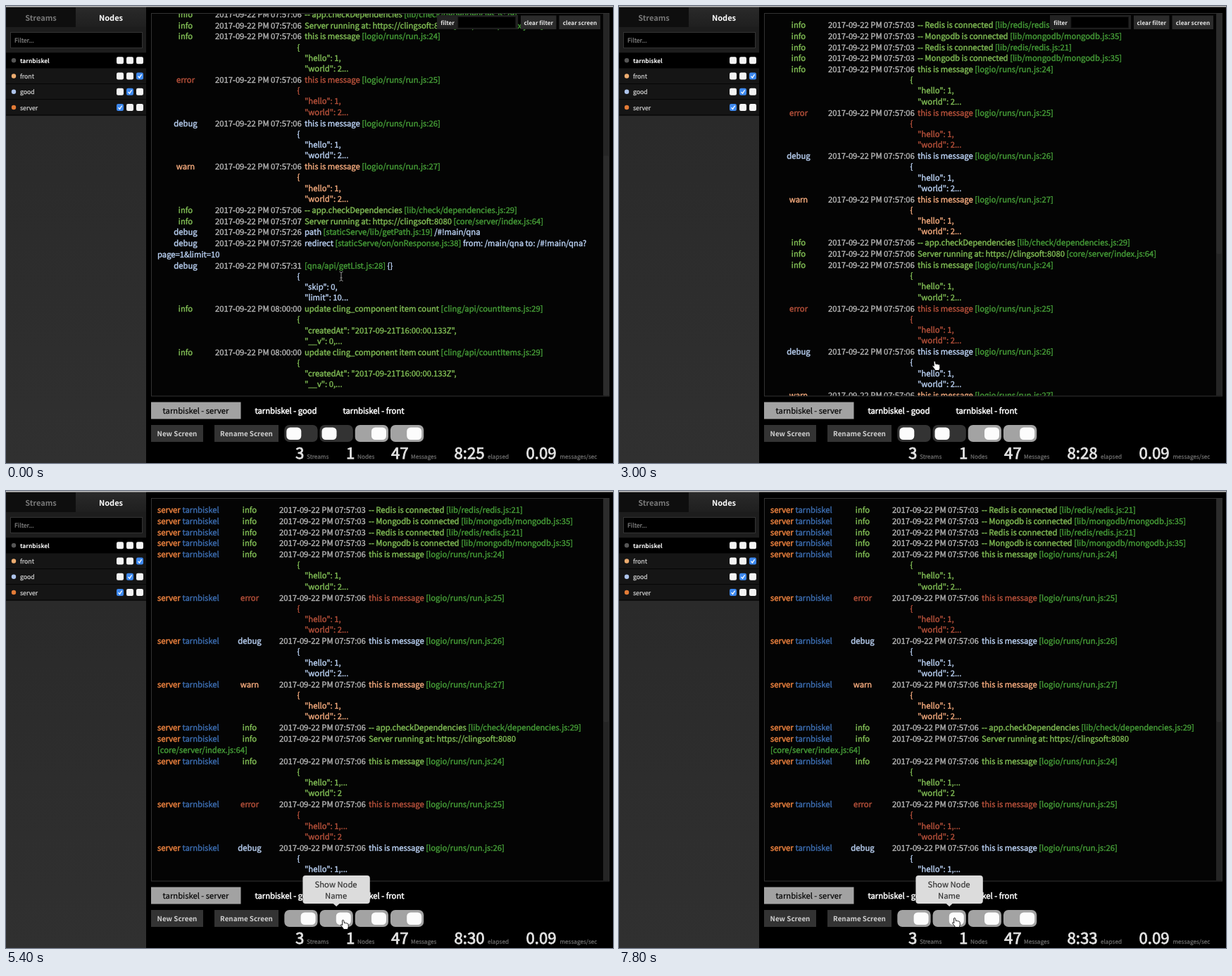
Recreate the animation shown at these times as an HTML page. Size 862 px wide and 649 px high, loop 8000 ms.

```html
<!DOCTYPE html>
<html lang="en">
<head>
<meta charset="utf-8">
<title>Log monitor</title>
<style>
html, body { margin: 0; width: 100%; height: 100%; overflow: hidden; background: #000; }
svg { display: block; width: 862px; height: 649px; }
text {
  font-family: "Noto Sans CJK SC", "Noto Sans CJK JP", "Noto Sans", sans-serif;
  font-size: 11.25px; stroke-width: .4; white-space: pre; text-rendering: geometricPrecision;
}
</style>
</head>
<body>
<script>
const LOOP = 8000, STEP = 200;
const NODE = 'tarnbiskel';
const COLORS = { info: '#80bd55', error: '#b5503a', debug: '#b9d0f2', warn: '#f2a97c' };
const GREEN = '#459c37', ORANGE = '#e27c3c', BLUE = '#3b6bad', GREY = '#b6b6b6';

function el(tag, attrs, parent) {
  const node = document.createElementNS('http://www.w3.org/2000/svg', tag);
  for (const key in attrs) node.setAttribute(key, attrs[key]);
  if (parent) parent.append(node);
  return node;
}
const svg = el('svg', { viewBox: '0 0 862 649' }, document.body);

function rect(x, y, width, height, fill, more = {}, parent = svg) {
  return el('rect', { x, y, width, height, fill, ...more }, parent);
}
function label(x, y, string, color, { size, bold, anchor = 'start', weight } = {}, parent = svg) {
  const node = el('text', { x, y, fill: color, stroke: color, 'text-anchor': anchor }, parent);
  if (size) node.style.fontSize = size + 'px';
  if (weight) node.style.strokeWidth = weight;
  if (bold) { node.style.fontWeight = 700; node.style.strokeWidth = 0; }
  node.textContent = string;
  return node;
}
const mid = (more = {}) => ({ anchor: 'middle', ...more });

function gradient(id, top, bottom) {
  const g = el('linearGradient', { id, x2: 0, y2: 1 }, defs);
  el('stop', { 'stop-color': top }, g);
  el('stop', { offset: 1, 'stop-color': bottom }, g);
  return `url(#${id})`;
}
const defs = el('defs', {}, svg);
rect(206, 11, 642, 542.5, '#000', {}, el('clipPath', { id: 'pane' }, defs));

// Sidebar
rect(0, 0, 862, 649, '#000');
rect(0, 0, 199, 649, gradient('side', '#282828', '#303030'));
rect(0, 30, 199, 37, '#1d1d1d');
rect(0, 2, 99, 28, '#0e0e0e');
rect(99, 2, 100, 28, gradient('tab', '#2a2a2a', '#1f1f1f'));
rect(0, 0, 862, 1.5, '#c4c4c4');
label(49.5, 21, 'Streams', '#777', mid({ bold: true, size: 11 }));
label(149, 21, 'Nodes', '#fff', mid({ bold: true, size: 11 }));
rect(6.5, 37.5, 187, 22, '#000', { stroke: '#333' });
label(12, 52, 'Filter...', '#888', { size: 8.7, weight: .2 });

[[NODE, '#555', -1], ['front', '#edac70', 2], ['good', '#adc3ea', 1], ['server', '#e37c37', 0]]
  .forEach(([name, color, checked], i) => {
    const y = 77.3 + i * 22.25;
    rect(0, y - 11, 199, 22.2, i ? '#151515' : '#000');
    rect(0, y + 10.5, 199, 1, '#000');
    el('circle', { cx: 11, cy: y, r: 3.2, fill: color }, svg);
    label(20, y + 3.5, name, i ? '#ccc' : '#fff', { size: i ? 8.7 : 8.4, bold: !i, weight: .25 });
    for (let k = 0; k < 3; k++) {
      const x = 162 + k * 14;
      rect(x - 5, y - 5, 10, 10, k === checked ? '#3d88ee' : '#f4f4f4', { rx: 2.2 });
      if (k === checked) {
        el('path', { d: `M${x - 2.4} ${y + .2}l1.9 2.2 3.1-4.8`, fill: 'none', stroke: '#fff', 'stroke-width': 1.3 }, svg);
      }
    }
  });

// Log pane
rect(206.5, 10.5, 650, 543.5, '#040404', { stroke: '#333' });
rect(848, 11, 8.5, 542.5, '#252525');
const thumb = rect(848.5, 11, 7.5, 341, '#2c2c2c', { rx: 2 });
const log = el('g', {}, el('g', { 'clip-path': 'url(#pane)' }, svg));

const row = (level, time, message, pre, tail) => ({ level, time, message, pre, tail });
const burst = () => Object.keys(COLORS).map((level, i) =>
  row(level, '07:57:06', `this is message [logio/runs/run.js:${24 + i}]`, ['"hello": 1,', '"world": 2']));
const boot = time => [
  row('info', '07:57:06', '-- app.checkDependencies [lib/check/dependencies.js:29]'),
  row('info', time, 'Server running at: https://clingsoft:8080 [core/server/index.js:64]')
];
const connect = [
  row('info', '07:57:03', '-- Redis is connected [lib/redis/redis.js:21]'),
  row('info', '07:57:03', '-- Mongodb is connected [lib/mongodb/mongodb.js:35]')
];
const update = row('info', '08:00:00', 'update cling_component item count [cling/api/countItems.js:29]',
  ['"createdAt": "2017-09-21T16:00:00.133Z",', '"__v": 0,']);
const rows = [
  ...connect, ...connect, ...burst(), ...boot('07:57:06'), ...burst(), ...boot('07:57:07'),
  row('debug', '07:57:26', 'path [staticServe/lib/getPath.js:19] /#!main/qna'),
  row('debug', '07:57:26', 'redirect [staticServe/on/onResponse.js:38] from: /main/qna to: /#!main/qna?', null, 'page=1&limit=10'),
  row('debug', '07:57:31', '[qna/api/getList.js:28] {}', ['"skip": 0,', '"limit": 10']),
  update, update
];

function richText(x, y, message, color) {
  const node = label(x, y, '', color, {}, log);
  for (const part of message.split(/(\[.*?\])/)) {
    const paint = part[0] === '[' ? GREEN : color;
    el('tspan', { fill: paint, stroke: paint }, node).textContent = part;
  }
}

function layout(stream, node, level) {
  const LINE = 15.75, PRE = 15.2;
  const timeX = 215 + stream * 35.5 + node * 55.5 + level * 82;
  const full = stream && node && level;
  let y = 31, wrapped = false;
  log.replaceChildren();
  for (const r of rows) {
    const color = COLORS[r.level];
    let { message, tail } = r;
    if (full && message.startsWith('Server')) {
      const cut = message.indexOf('[');
      tail = message.slice(cut);
      message = message.slice(0, cut);
      wrapped = true;
    }
    if (stream) label(215, y, 'server', ORANGE, { weight: .55 }, log);
    if (node) label(215 + stream * 35.5, y, NODE, BLUE, {}, log);
    if (level) label(timeX - 42, y, r.level, color, mid(), log);
    label(timeX, y, '2017-09-22 PM ' + r.time, GREY, {}, log);
    richText(timeX + 127, y, message, color);
    if (tail) richText(215, y += LINE, tail, color);
    if (r.pre) {
      const [a, b] = r.pre;
      label(413.5, y + PRE, '{', color, {}, log);
      label(424, y + PRE * 2, a + (wrapped ? '...' : ''), color, {}, log);
      label(424, y + PRE * 3, b + (wrapped ? '' : '...'), color, {}, log);
      y += 45.85;
    }
    y += LINE;
  }
  thumb.setAttribute('height', full ? 317 : 341);
}

// Filter controls, shown while the pointer is over the pane
const tools = el('g', {}, svg);
rect(612, 13, 115, 20, '#222', {}, tools);
rect(642, 15.5, 81.5, 15.5, '#000', { stroke: '#111' }, tools);
rect(731, 13.5, 50.5, 19.5, '#2b2b2b', {}, tools);
rect(785.5, 13.5, 58.5, 19.5, '#2b2b2b', {}, tools);
[[627, 'filter'], [756.3, 'clear filter'], [815, 'clear screen']].forEach(([x, s]) =>
  label(x, 27, s, '#e6e6e6', mid({ size: 8.2, bold: true }), tools));

// Footer
rect(206, 562.5, 127.5, 24, '#a2a2a2');
label(269.5, 579.3, NODE + ' - server', '#000', mid({ weight: .2 }));
label(397.5, 579.3, NODE + ' - good', '#fff', mid({ weight: .5 }));
label(522, 579.3, NODE + ' - front', '#fff', mid({ weight: .5 }));
[[206, 74, 'New Screen'], [296, 91, 'Rename Screen']].forEach(([x, w, s]) => {
  rect(x, 595, w, 24, '#333');
  label(x + w / 2, 611, s, '#d0d0d0', mid({ size: 9.8, bold: true }));
});
const stats = [[411, '3', 427, 'Streams'], [483, '1', 499, 'Nodes'], [547, '47', 575, 'Messages'],
  [636.5, '', 684, 'elapsed'], [738.5, '0.09', 786.5, 'messages/sec']].map(([x, value, nameX, name]) => {
  label(nameX, 642.5, name, '#747474', { size: 8.2, weight: .2 });
  return label(x, 642.5, value, '#e4e4e4', { size: 22.2, weight: .8 });
});

const toggleX = i => 395.3 + i * 50.2;
const toggles = [0, 1, 2, 3].map(i => ({
  track: rect(toggleX(i), 595, 47.3, 24, '#333', { rx: 7 }),
  knob: rect(0, 598.5, 21, 17.5, '#fcfcfc', { rx: 5.5 })
}));

const tips = [['Show Stream', 'Name'], ['Show Node', 'Name'], ['Show Level']].map((lines, i) => {
  const g = el('g', {}, svg), cx = toggleX(i) + 23.6, top = 578 - 16 * lines.length;
  rect(cx - 47.7, top, 95.4, 586 - top, '#dcdcdc', { rx: 4 }, g);
  el('path', { d: `M${cx - 5} 585.5h10l-5 4.5z`, fill: '#dcdcdc' }, g);
  lines.forEach((s, k) => label(cx - .5, top + 17 + k * 16, s, '#333', mid({ weight: .2 }), g));
  return g;
});

const cursor = el('g', {}, svg);
const beam = el('path', { d: 'M-2.5-6.5q2 0 2.5 1.5q.5-1.5 2.5-1.5M0-5v10M-2.5 6.5q2 0 2.5-1.5q.5 1.5 2.5 1.5M-1.5 2h3', fill: 'none', stroke: '#999', 'stroke-width': 1 }, cursor);
const hand = el('path', {
  d: 'M-3.5-6c.3-1 1.8-1 2.1.1l.9 3.6c.5-.8 1.7-.6 1.9.2.6-.6 1.6-.4 1.8.4.8-.5 1.7 0 1.8 1l.3 3c0 1.8-1 2.3-1 4.2h-5.8c-.5-2-3-3.8-4-6 0-1.2 1.3-1.2 2.3 0z',
  fill: '#fff', stroke: '#000', 'stroke-width': .9, 'stroke-linejoin': 'round'
}, cursor);

// Motion
const PATH = [[0, 476, 384], [600, 476, 384], [1300, 465, 412], [1600, 465, 412], [2000, 473, 409],
  [2600, 473, 409], [3400, 428, 613], [3700, 430, 616], [4300, 430, 616], [4800, 480, 616],
  [5400, 481, 616], [5800, 526, 614], [6900, 526, 614], [7500, 479, 613], [LOOP, 479, 613]];
const clamp = v => Math.min(1, Math.max(0, v));
const smooth = v => v * v * (3 - 2 * v);
const ramp = (t, start, length = 300) => clamp((t - start) / length);
const show = (node, on) => node.setAttribute('visibility', on ? 'visible' : 'hidden');

function pointer(t) {
  const i = PATH.findIndex(p => p[0] > t);
  const [t0, x0, y0] = PATH[i - 1], [t1, x1, y1] = PATH[i];
  const k = smooth((t - t0) / (t1 - t0));
  return [x0 + (x1 - x0) * k, y0 + (y1 - y0) * k];
}

let mode = '';
function draw(t) {
  const [x, y] = pointer(t);
  cursor.setAttribute('transform', `translate(${x} ${y})`);
  show(beam, t < 1000);
  show(hand, t >= 1000);
  show(tools, y < 554);
  tips.forEach((tip, i) => show(tip, y > 595 && x > toggleX(i) && x < toggleX(i) + 47.3));

  const states = [ramp(t, 3740), ramp(t, 5100), 1 - ramp(t, 6140) + ramp(t, 6940), 1];
  toggles.forEach(({ track, knob }, i) => {
    const s = states[i], c = Math.round(51 + 112 * s);
    track.setAttribute('fill', `rgb(${c},${c},${c})`);
    knob.setAttribute('x', toggleX(i) + 3 + 20.3 * s);
  });

  const shown = [t >= 3740, t >= 5100, t < 6140 || t >= 6940].map(Number);
  if (mode !== shown.join()) {
    mode = shown.join();
    layout(...shown);
  }
  const left = 1 - smooth(ramp(t, 1600, 400));
  log.setAttribute('transform', `translate(0 ${-324.5 * left})`);
  thumb.setAttribute('y', 11 + 201.5 * left);
  stats[3].textContent = '8:' + Math.floor(25.5 + t / 1000);
}

const start = performance.now();
function tick() {
  const t = (performance.now() - start) % LOOP;
  draw(Math.floor(t / STEP) * STEP);
  requestAnimationFrame(tick);
}
tick();
</script>
</body>
</html>
```
